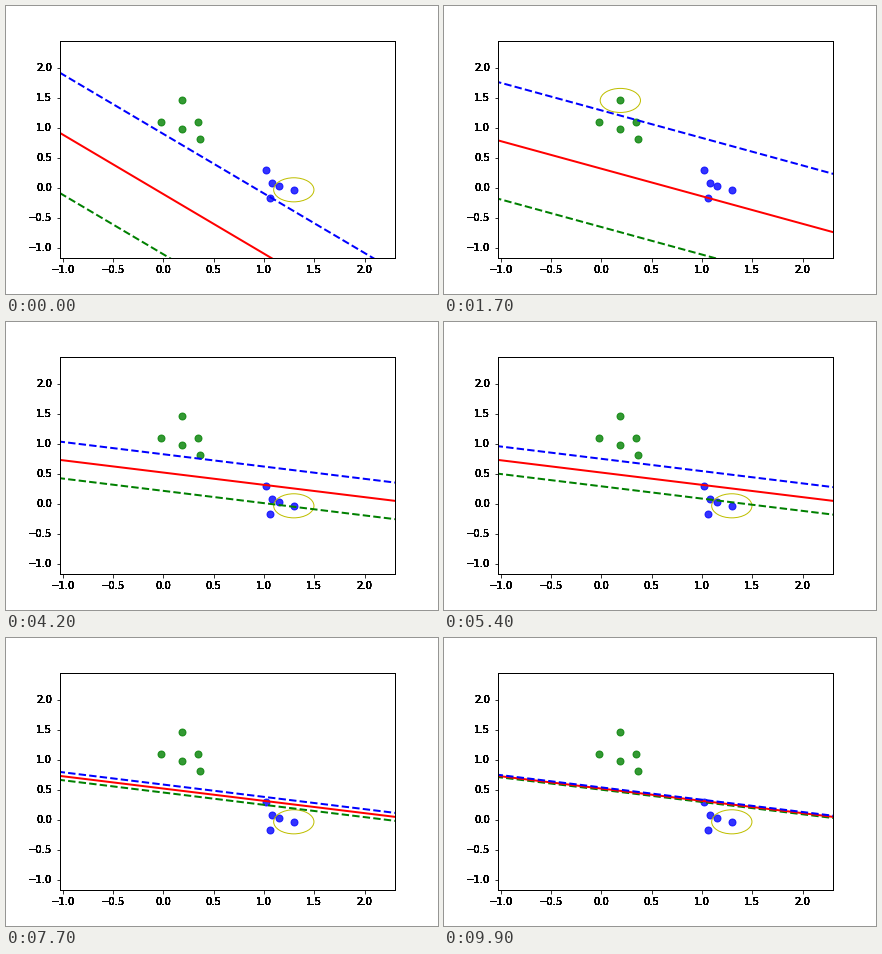
A matplotlib script for the animation above (10000 ms loop, 432 px wide and 288 px high).

```python
import numpy as np
import matplotlib.pyplot as plt
from matplotlib.animation import FuncAnimation

FRAMES = 100
green = np.array([(-0.025, 1.09), (0.19, 1.455), (0.185, 0.98),
                  (0.35, 1.09), (0.37, 0.815)])
blue = np.array([(1.025, 0.30), (1.085, 0.08), (1.15, 0.03),
                 (1.297, -0.03), (1.06, -0.16)])
PICK_GREEN, PICK_BLUE = green[1], blue[3]

# How many times the green point has been drawn by a given step
KEY_STEPS = [0, 10, 17, 22, 26, 41, 44, 65, 76, 78, 98]
KEY_DRAWS = [0, 4, 8, 10, 14, 22, 22, 30, 38, 38, 51]

# Boundary a*x + b*y + c = 0: idle, then learn, then narrow the margin
START = np.array([0.99, 1.0, 0.1])
STEP = np.array([-0.1293, 0.008, -0.108])
IDLE, LEARN = 4, 6
EXPAND = 1.1


def draws(i):
    return int(np.interp(i, KEY_STEPS, KEY_DRAWS) + 1e-6)


def coefs(n):
    learned = START + STEP * np.clip(n - IDLE, 0, LEARN)
    return learned * EXPAND ** max(0, n - IDLE - LEARN)


def heavy(artist, times=10):
    """Paint an artist several times over so its soft edges turn solid."""
    draw = artist.draw

    def repeat(renderer):
        for _ in range(times):
            draw(renderer)

    artist.draw = repeat


fig = plt.figure(figsize=(6, 4), dpi=72, facecolor="white")
ax = fig.add_axes([0.125, 0.125, 0.775, 0.755])
ticks = np.arange(-1, 2.1, 0.5)
ax.set(xlim=(-1.025, 2.3), ylim=(-1.163, 2.45), xticks=ticks, yticks=ticks)
ax.tick_params(axis="y", pad=4.5)
for label in ax.get_yticklabels():
    label.set_va("center")
for artist in [*ax.get_xticklabels(), *ax.get_yticklabels(),
               *ax.spines.values()]:
    heavy(artist)

ax.scatter(*green.T, s=49, color="green", alpha=0.8)
ax.scatter(*blue.T, s=49, color="blue", alpha=0.8)
ring = plt.Circle(PICK_BLUE, 0.2, color="y", fill=False, lw=1)
ax.add_patch(ring)

xs = np.array([-10, 10])
lower, = ax.plot([], [], "g--", lw=2)
middle, = ax.plot([], [], "r-", lw=2)
upper, = ax.plot([], [], "b--", lw=2)


def update(i):
    n = draws(i)
    ring.center = PICK_GREEN if n > draws(i - 1) else PICK_BLUE
    a, b, c = coefs(n)
    for line, level in ((lower, -1), (middle, 0), (upper, 1)):
        line.set_data(xs, (level - c - a * xs) / b)
    return ring, lower, middle, upper


anim = FuncAnimation(fig, update, frames=FRAMES, interval=100,
                     repeat=True, repeat_delay=0)
plt.show()
```
